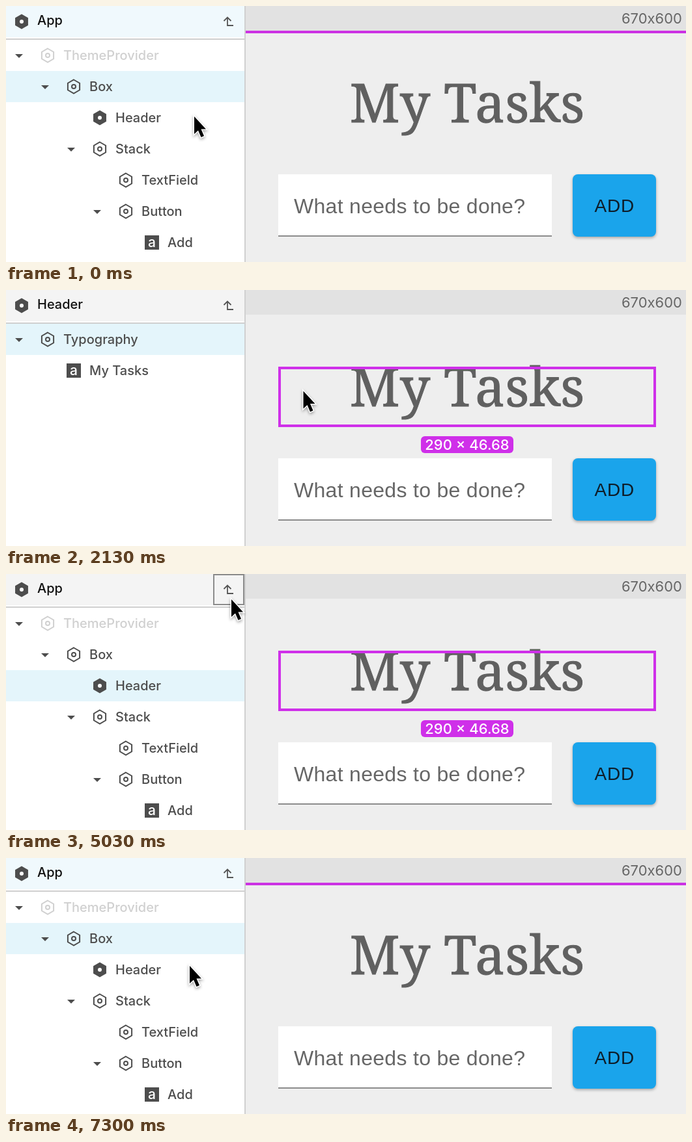
Animation, 1044 px wide and 394 px high, one loop 8.2 s. Source, as an HTML page:

```html
<!DOCTYPE html>
<html lang="en">
<head>
<meta charset="utf-8">
<title>Component tree</title>
<style>
  html, body { margin: 0; width: 100%; height: 100%; overflow: hidden; background: #eee; }
  svg { display: block; width: 100%; height: 100%; }
  text { font: 500 20px Inter, sans-serif; fill: #4d4d4d; white-space: pre; }
  .mono { font: 400 20px "Noto Sans Mono", monospace; }
  .glyph { font: 500 16px "Noto Sans Mono", monospace; fill: #fff; text-anchor: middle; }
  .letter { font: 500 21px Inter, sans-serif; fill: #fff; text-anchor: middle; }
  .title { fill: #111; }
  .size { font-size: 22px; font-weight: 400; fill: #666; text-anchor: end; }
  .badge { font-size: 22px; fill: #fff; text-anchor: middle; }
  .heading { font: 500 82px "Noto Serif", serif; fill: #606060; stroke: #606060; stroke-width: 1; text-anchor: middle; }
  .hint { font: 32px "Liberation Sans", Arial, sans-serif; letter-spacing: .3px; fill: #666; }
  .add { font: 28px "Liberation Sans", Arial, sans-serif; letter-spacing: .8px; fill: #0e1d29; }
  .faint { color: #d0d0d0; }
  .faint text { fill: #d0d0d0; }
  .button { filter: drop-shadow(0 2px 2px rgba(0, 0, 0, .3)); }
  #cursor { filter: drop-shadow(0 2px 2px rgba(0, 0, 0, .35)); }
</style>
</head>
<body>
<svg viewBox="0 0 1044 394" color="#4d4d4d">
  <rect width="1044" height="394" fill="#eee"/>
  <rect x="368" width="676" height="38" fill="#e2e2e2"/>
  <text class="size" x="1038" y="27">670x600</text>
  <text class="heading" x="708" y="179">My Tasks</text>
  <rect x="418" y="259" width="420" height="96" fill="#fff"/>
  <rect x="418" y="353" width="420" height="2" fill="#8c8c8c"/>
  <text class="hint" x="442" y="319">What needs to be done?</text>
  <rect class="button" x="870" y="259" width="128" height="96" rx="8" fill="#1aa4eb"/>
  <text class="add" x="903.500" y="317">ADD</text>

  <rect id="rootOutline" x="368" y="38" width="676" height="4" fill="#cb32e3"/>
  <g id="headerOutline">
    <rect x="420" y="120" width="576" height="89" fill="none" stroke="#cf30e9" stroke-width="4"/>
    <rect x="637" y="225" width="142" height="26" rx="6" fill="#cf30e9"/>
    <text class="badge" x="708" y="246">290 × 46.68</text>
  </g>

  <rect width="366" height="394" fill="#fff"/>
  <rect id="bar" width="366" height="48"/>
  <rect y="50" width="366" height="2" fill="#cfcfcf"/>
  <rect x="366" width="2" height="394" fill="#d0d0d0"/>
  <rect id="selection" width="366" height="48" fill="#e4f5fb"/>
  <g id="trees"></g>
  <g id="up" fill="none">
    <path d="M349 30H340V18M334.500 23L340 17.500 345.500 23" stroke="#555" stroke-width="1.800"/>
    <rect id="upHover" x="319" y="1" width="46" height="46" stroke="#8c8c8c" stroke-width="2"/>
  </g>

  <circle id="ring" r="43" fill="none" stroke="#000" stroke-width="3"/>
  <path id="cursor" d="M1 1V28L7 22.500 11.500 33 16 31 11.500 20.500H19Z"
        stroke="#fff" stroke-width="3" paint-order="stroke"/>
</svg>
<script>
const LOOP = 8200;
const $ = id => document.getElementById(id);
const show = (id, on) => $(id).setAttribute('display', on ? 'inline' : 'none');

const hexagon = r => {
  const w = r * .866;
  return `M0 ${-r}L${w} ${-r / 2}V${r / 2}L0 ${r}L${-w} ${r / 2}V${-r / 2}Z`;
};
const tile = (glyph, cls = 'glyph', y = 6) =>
  `<rect x="-11" y="-11" width="22" height="22" fill="currentColor"/><text class="${cls}" y="${y}">${glyph}</text>`;
const icons = {
  component: `<path d="${hexagon(11.5)}" fill="currentColor"/><circle r="3" fill="#fff"/>`,
  element: `<g fill="none" stroke="currentColor" stroke-width="2"><path d="${hexagon(10.5)}"/><circle r="3"/></g>`,
  text: tile('a', 'letter', 7),
  list: tile('['),
  condition: tile('?:'),
  literal: tile('10'),
};

// Each row: depth, icon, label, expandable, label class
const trees = {
  App: [
    [0, 'element', 'ThemeProvider', true, 'faint'],
    [1, 'element', 'Box', true],
    [2, 'component', 'Header'],
    [2, 'element', 'Stack', true],
    [3, 'element', 'TextField'],
    [3, 'element', 'Button', true],
    [4, 'text', 'Add'],
  ],
  Header: [
    [0, 'element', 'Typography', true],
    [1, 'text', 'My Tasks'],
  ],
  Step: [
    [0, 'list', '', true],
    [1, 'condition', 'step', true, 'mono'],
    [2, 'component', 'App'],
    [2, 'literal', 'null', false, 'mono'],
    [1, 'component', 'Step'],
  ],
};

const rowMarkup = ([depth, icon, label, expandable, cls = ''], i) => `
  <g transform="translate(${depth * 40} ${76 + i * 48})">
    ${expandable ? '<path d="M14 -2H26L20 4Z" fill="currentColor"/>' : ''}
    <g class="${cls === 'faint' ? cls : ''}">
      <g transform="translate(64 0)">${icons[icon]}</g>
      <text class="${cls}" x="88" y="${cls === 'mono' ? 8 : 7}">${label}</text>
    </g>
  </g>`;

$('trees').innerHTML = Object.entries(trees).map(([name, rows]) => `
  <g id="tree${name}">
    <g transform="translate(24 24)">${icons.component}</g>
    <text class="title" x="48" y="29">${name}</text>
    ${rows.map(rowMarkup).join('')}
  </g>`).join('');

// Start time, open tree, selected row
const views = [
  [0, 'App', 1], [1230, 'App', 2], [1330, 'Header', 0],
  [3300, 'App', 2], [5100, 'Step', 2], [7300, 'App', 1],
];
const clicks = [[1130, 1200], [1260, 1330], [3200, 3270], [4970, 5030], [6970, 7030], [7130, 7200]];
// Time, x, y of the pointer tip
const pointer = [
  [0, 288, 169], [400, 460, 162], [2129, 460, 162], [2130, 455.5, 154.5], [2730, 345, 38],
  [5900, 345, 38], [6470, 281, 165], [LOOP, 281, 165],
];

function pointerAt(t) {
  const next = pointer.findIndex(p => t < p[0]);
  const [t0, x0, y0] = pointer[next - 1], [t1, x1, y1] = pointer[next];
  const p = (t - t0) / (t1 - t0), e = p * p * (3 - 2 * p);
  return [x0 + (x1 - x0) * e, y0 + (y1 - y0) * e];
}

function draw(t) {
  const [, tree, row] = views.findLast(v => t >= v[0]);
  const [x, y] = pointerAt(t);
  const overBar = x < 366 && y < 50;

  for (const name in trees) show('tree' + name, name === tree);
  $('selection').setAttribute('y', 52 + row * 48);
  const tinted = (tree === 'App' && row === 1) || (tree === 'Header' && overBar);
  $('bar').setAttribute('fill', tinted ? '#f0f9fd' : '#f4f4f4');
  show('up', tree !== 'Step');
  show('upHover', overBar && x > 318 && y < 48);

  const headerSelected = t >= 1230 && t < 5200;
  show('headerOutline', headerSelected);
  show('rootOutline', !headerSelected);

  show('ring', clicks.some(([from, to]) => t >= from && t < to));
  $('ring').setAttribute('transform', `translate(${x + 1} ${y + 2})`);
  $('cursor').setAttribute('transform', `translate(${x} ${y})`);
}

const start = performance.now();
function tick() {
  draw((performance.now() - start) % LOOP);
  requestAnimationFrame(tick);
}
tick();
</script>
</body>
</html>
```
